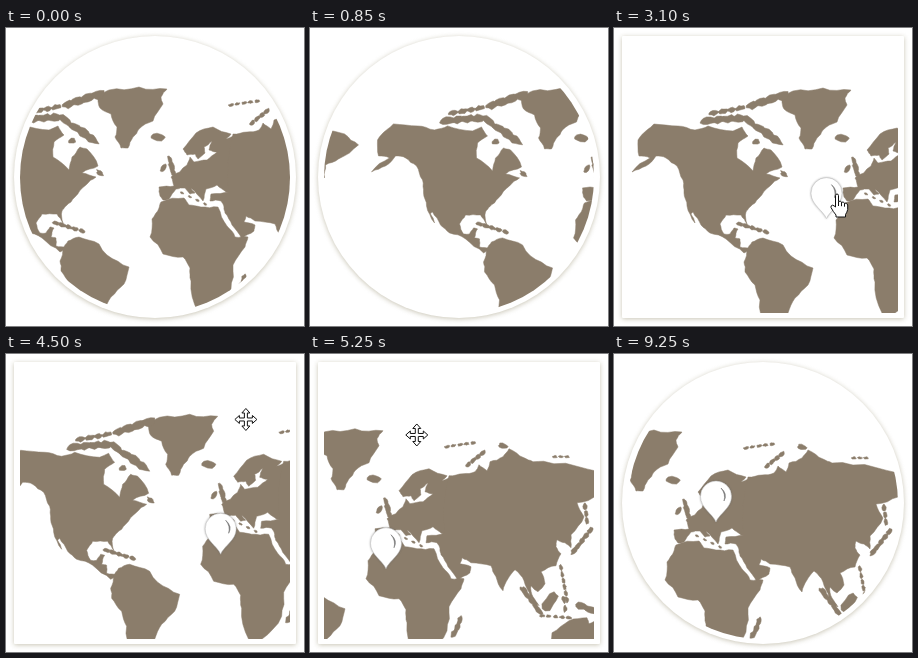
Recreate the animation shown at these times as an HTML page. Size 298 px wide and 298 px high, loop 9.8 s.

```html
<!DOCTYPE html>
<html>
<head>
<meta charset="utf-8">
<title>Map with marker</title>
<style>
  html, body { margin: 0; width: 100%; height: 100%; overflow: hidden; background: #fff; }
  svg { display: block; width: 100vw; height: 100vh; }
  #land path { fill: #8b7d6b; stroke: #8b7d6b; stroke-width: .5; stroke-linejoin: round; }
  .cursor { fill: #fff; stroke: #111; stroke-width: 1; stroke-linejoin: round; }
</style>
</head>
<body>
<svg viewBox="0 0 298 298">
  <defs>
    <filter id="soft" x="-10%" y="-10%" width="120%" height="120%"><feGaussianBlur stdDeviation="2.4"/></filter>
    <filter id="pinSoft" x="-30%" y="-30%" width="160%" height="160%"><feGaussianBlur stdDeviation="1"/></filter>
    <clipPath id="clip"><rect id="inner" x="14" y="14" width="270" height="271"/></clipPath>
    <g id="land"></g>
    <path id="pinShape" d="M0 0C-3-8-15.500-14-15.500-25.500A15.500 15.500 0 0 1 15.500-25.500C15.500-14 3-8 0 0Z"/>
  </defs>
  <rect width="298" height="298" fill="#fff"/>
  <rect id="shade" x="8" y="9" width="282" height="282" fill="#aaa48c" opacity=".65" filter="url(#soft)"/>
  <rect id="panel" x="8" y="8" width="282" height="282" fill="#fff"/>
  <g clip-path="url(#clip)">
    <g id="world"><use href="#land"/><use href="#land" id="copy"/></g>
  </g>
  <g id="pin">
    <use href="#pinShape" fill="#555" opacity=".6" filter="url(#pinSoft)"/>
    <use href="#pinShape" fill="#fff" stroke="#bbb" stroke-width=".5"/>
    <path d="M5-34Q12-28 8-21Q10-28 5-34Z" fill="#777" stroke="#777" stroke-width=".6"/>
  </g>
  <g id="arrow" class="cursor"><path d="M.5 .5V16L4 12.800 6.600 18.600 9 17.500 6.500 11.800H11.500Z"/></g>
  <g id="hand" class="cursor">
    <path d="M-1.500 12.500V1.200Q-1.500-.5 0-.5T1.500 1.200V7Q3.500 6 4.500 7.700Q6.500 7 7.500 8.700Q10 8 10.700 10.500V15Q10 18 8.500 20V22.500H-1V20.500Q-4 17-6 13Q-6.500 11-4.500 10.700Q-3 11-1.500 12.500Z"/>
    <path d="M1.500 7v4.500M4.500 7.700v4M7.500 8.700v3.500" fill="none"/>
  </g>
  <g id="move" class="cursor"></g>
</svg>
<script>
const LOOP = 9800, STEP = 50, WORLD = 500;
const $ = id => document.getElementById(id);

let seed = 7;
const rnd = () => (seed = seed * 16807 % 2147483647) / 2147483647;
const toPath = pts => `<path d="M${pts.map(p => p.map(v => v.toFixed(1))).join(' ')}Z"/>`;

// Breaks every edge of a closed outline at a shifted midpoint, twice.
function rough(pts, amount = .16, depth = 2) {
  if (!depth) return pts;
  const next = pts.flatMap((a, i) => {
    const b = pts[(i + 1) % pts.length], k = (rnd() - .5) * amount;
    const dx = b[0] - a[0], dy = b[1] - a[1];
    return [a, [a[0] + dx / 2 - dy * k, a[1] + dy / 2 + dx * k]];
  });
  return rough(next, amount, depth - 1);
}

// A landmass from a few key points.
function coast(text) {
  const n = text.split(' ').map(Number), pts = [];
  while (n.length) pts.push(n.splice(0, 2));
  return toPath(rough(pts));
}

// A row of uneven islands stretched along a line.
function isles(x0, y0, x1, y1, count, size) {
  const turn = Math.atan2(y1 - y0, x1 - x0), c = Math.cos(turn), s = Math.sin(turn);
  return Array.from({ length: count }, (_, i) => {
    const p = count > 1 ? i / (count - 1) : 0;
    const cx = x0 + (x1 - x0) * p, cy = y0 + (y1 - y0) * p;
    return toPath(Array.from({ length: 11 }, (_, j) => {
      const a = j / 11 * Math.PI * 2, r = size * (.7 + .5 * rnd());
      const u = 1.2 * r * Math.cos(a), v = .65 * r * Math.sin(a);
      return [cx + u * c - v * s, cy + u * s + v * c];
    }));
  }).join('');
}

const america = [
  coast('18 144 36 130 25 128 24 112 33 102 40 96 64 98 81 102 94 98 119 103 128 99 134 108 124 115 123 130 139 143 142 130 150 120 157 122 168 139 152 146 166 150 156 158 145 170 136 179 132 184 133 196 127 187 112 187 106 196 110 206 116 206 120 200 124 201 121 210 126 211 126 219 136 221 130 225 112 211 96 205 87 197 79 184 77 186 81 195 73 178 70 165 69 152 63 138 52 130 42 128 32 138'),
  coast('133 221 138 214 149 210 169 217 177 228 199 240 194 257 181 270 174 285 168 300 148 300 146 272 141 257 131 244 130 234'),
  coast('168 72 179 63 209 60 237 62 231 70 233 77 223 94 209 102 203 110 198 121 191 121 185 110 187 100 181 87 170 81'),
  isles(138, 77, 168, 68, 4, 6), isles(100, 85, 126, 80, 4, 4), isles(94, 93, 125, 90, 4, 6),
  isles(136, 94, 162, 112, 4, 6.5), isles(142, 114, 146, 114, 1, 4), isles(170, 146, 174, 149, 1, 3.5),
  isles(126, 196, 152, 204, 5, 3), isles(228, 110, 236, 110, 1, 6)
].join('');

const oldWorld = [
  // Europe
  coast('61 185 60 176 75 175 72 166 88 154 91 146 95 151 108 149 118 141 110 139 113 130 105 136 106 142 99 148 96 143 88 144 84 138 97 122 114 116 132 123 127 128 142 123 142 183 127 181 118 174 107 178 104 190 92 177 96 182 91 183 86 177 77 178 70 188 64 189'),
  // Asia
  coast('134 123 148 121 160 119 164 112 172 118 175 109 188 104 194 96 209 105 218 109 239 111 284 119 322 122 336 133 316 147 303 153 302 166 296 150 284 143 262 150 269 164 256 182 256 195 250 190 242 187 241 194 246 201 241 213 226 219 230 231 223 239 216 233 218 244 224 253 215 244 209 228 200 217 193 226 188 238 181 224 176 213 156 210 147 205 145 211 156 214 155 220 143 228 133 214 126 202 125 196 122 190 111 190 112 183 130 181'),
  // Africa, Australia
  coast('62 191 85 187 90 194 102 196 119 196 128 215 136 226 149 226 146 236 134 254 132 278 112 301 99 301 92 270 91 257 84 246 64 243 51 226 53 208 60 197'),
  coast('234 301 237 280 254 268 272 265 274 271 284 267 302 301'),
  // northern islands
  isles(74, 161, 71, 149, 3, 4), isles(64, 157, 66, 154, 1, 3.5), isles(132, 94, 158, 90, 5, 2.2),
  isles(153, 112, 168, 100, 4, 3), isles(188, 93, 194, 94, 1, 4), isles(240, 104, 252, 104, 3, 2),
  // Mediterranean and Madagascar
  isles(83, 182, 106, 193, 4, 1.5), isles(145, 267, 139, 281, 3, 4),
  // eastern islands
  isles(270, 154, 272, 168, 3, 3), isles(275, 178, 259, 198, 5, 3.5), isles(246, 215, 252, 247, 6, 2.5),
  isles(209, 238, 224, 258, 5, 4), isles(227, 263, 254, 265, 5, 2.2), isles(236, 248, 240, 243, 1, 9),
  isles(249, 247, 250, 256, 2, 3), isles(266, 253, 292, 264, 4, 6)
].join('');

$('land').innerHTML = america + `<g transform="translate(169 -16)">${oldWorld}</g>`;
$('copy').setAttribute('x', WORLD);
$('move').innerHTML = [0, 90, 180, 270].map(a =>
  `<path transform="rotate(${a})" d="M-1.500-1.500V-6.500H-4L0-11 4-6.500H1.500V-1.500"/>`).join('');

const part = (t, a, b) => Math.min(1, Math.max(0, (t - a) / (b - a)));
const out = p => 1 - (1 - p) ** 2;
const inOut = p => p * p * (3 - 2 * p);
// Moves between two points; each axis may have its own easing.
const go = (a, b, p, easeX = out, easeY = easeX) =>
  [a[0] + (b[0] - a[0]) * easeX(p), a[1] + (b[1] - a[1]) * easeY(p)];
const place = (el, [x, y]) => el.setAttribute('transform', `translate(${x.toFixed(2)} ${y.toFixed(2)})`);

const LAG = 22;
const dragA = (t, a, b) => go(a, b, part(t, 2650, 3550));
const pan = (t, a, b) => go(a, b, part(t, 4400, 5400), out, inOut);
const dragB = (t, a, b) => go(a, b, part(t, 6700, 7600), inOut, out);

function mapAt(t) {
  if (t < 1050) return go([-76, -1], [-WORLD, 0], part(t, 0, 1000), p => 1 - (1 - p) ** 1.2);
  return pan(t - LAG, [0, 0], [-169, 16]);
}

function pinAt(t) {
  if (t < 2600) return go([140, 90], [140, 166], part(t, 1050, 1350));
  if (t < 4300) return dragA(t - LAG, [140, 166], [240, 200]);
  if (t < 6600) return pan(t - LAG, [240, 200], [71, 216]);
  return dragB(t - LAG, [71, 216], [102, 168]);
}

function cursorAt(t) {
  if (t < 1700 || t >= 8300) return ['none', [0, 0]];
  if (t < 2600) {
    const p = go([160, 300], [148, 141], part(t, 1650, 2250));
    return [p[1] < 160 ? 'hand' : 'arrow', p];
  }
  if (t < 3750) return ['hand', dragA(t, [148, 141], [248, 175])];
  if (t < 4300) {
    const p = go([248, 175], [271, 65], part(t, 3750, 4050), inOut);
    return [p[1] > 160 ? 'hand' : 'arrow', p];
  }
  if (t < 5400) return ['move', pan(t, [272, 65], [103, 82])];
  if (t < 6650) return [t < 6250 ? 'arrow' : 'hand', go([102, 82], [72, 196], part(t, 5650, 6100), inOut)];
  return ['hand', dragB(t, [72, 196], [103, 146])];
}

function draw(t) {
  const square = inOut(part(t, 1550, 2250)) - inOut(part(t, 8250, 8850));
  for (const id of ['shade', 'panel']) $(id).setAttribute('rx', 141 - 140 * square);
  $('inner').setAttribute('rx', 135.5 * (1 - square));
  place($('world'), mapAt(t));
  place($('pin'), pinAt(t));
  $('pin').style.display = t < 1050 ? 'none' : '';
  const [kind, pos] = cursorAt(t);
  for (const id of ['arrow', 'hand', 'move']) {
    $(id).style.display = id === kind ? '' : 'none';
    place($(id), pos);
  }
}

function tick() {
  const t = performance.now() % LOOP;
  draw(Math.floor(t / STEP) * STEP);
  requestAnimationFrame(tick);
}
tick();
</script>
</body>
</html>
```
